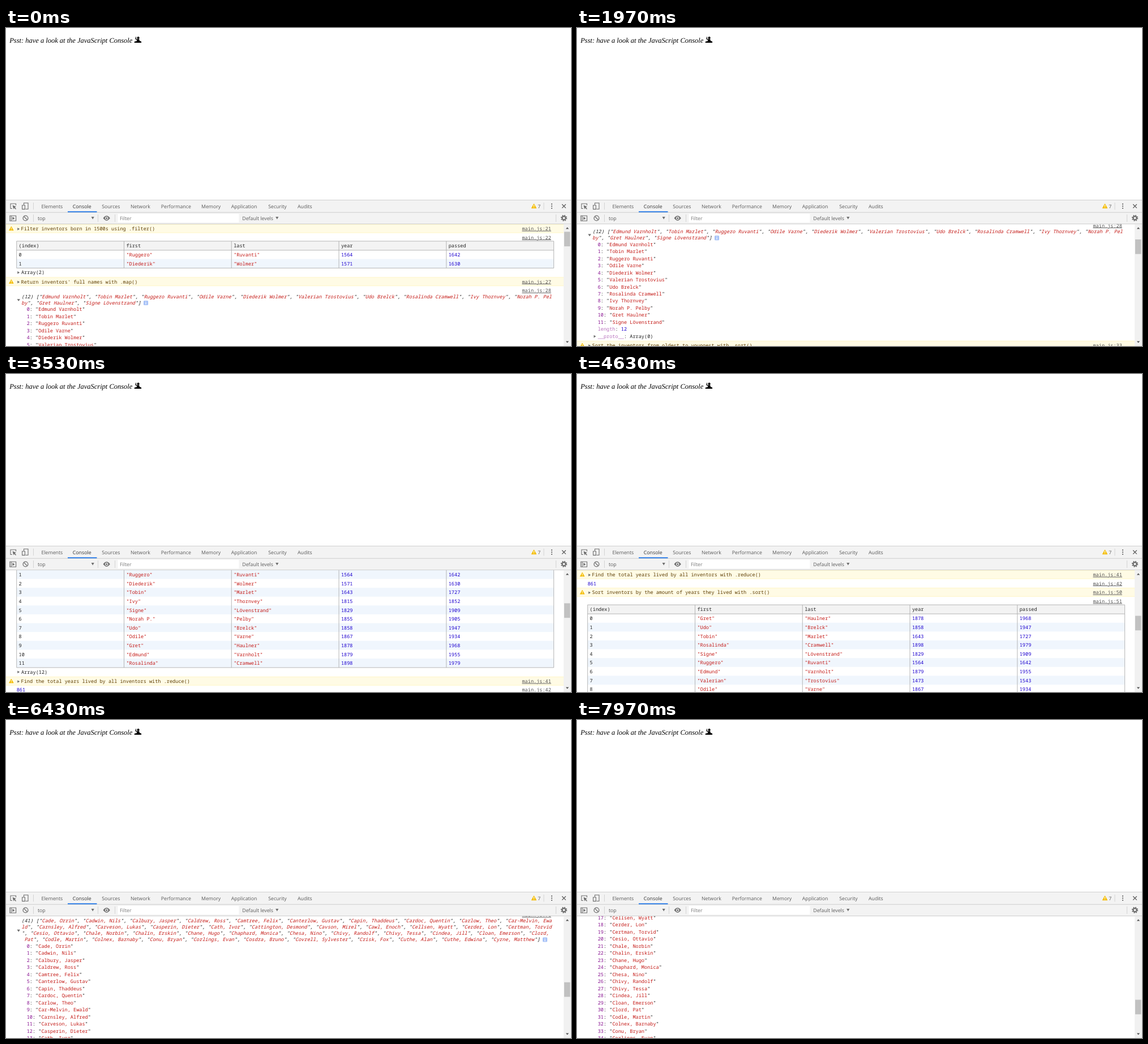
Recreate the animation shown at these times as an HTML page. Size 998 by 561 pixels, loop 8000 ms.

```html
<!DOCTYPE html>
<html lang="en">
<head>
<meta charset="utf-8">
<title>Console scroll</title>
<style>
  html, body { margin: 0; width: 100%; height: 100%; overflow: hidden; background: #fff; }
  #stage { display: block; width: 100vw; height: 100vh; }
  text { white-space: pre; text-rendering: geometricPrecision; }
  .page { font: italic 12.475px "Liberation Serif", "Times New Roman", serif; }
  .ui text { font: 8.75px "Open Sans", "Noto Sans", sans-serif; fill: #5a5a5a; }
  #log text { font: 11px "Noto Sans Mono", "DejaVu Sans Mono", monospace; fill: #222; }
  #log .it { font-style: italic; }
  #log .str { fill: #c41a16; }
  #log .num { fill: #1c00cf; }
  #log .key { fill: #881391; }
  #log .dim { fill: #b871bd; }
  #log .warn { fill: #5c3c00; }
  #log .link { fill: #545454; text-decoration: underline; }
</style>
</head>
<body>
<svg id="stage" viewBox="0 0 998 561" preserveAspectRatio="none">
  <rect width="998" height="561" fill="#fff"/>
  <text class="page" x="6.2" y="25.6">Psst: have a look at the JavaScript Console</text>
  <g>
    <circle cx="233.6" cy="17.4" r="2.1"/>
    <path d="M231.5 19.6h3.6l1.1 3.4 2.6.6.4 2.4h-12.6l.5-2.2 3.6-.5zM229.2 15.6l1 .2-.6 3 2.2 1.2-.3 1.3-3.3-1.9z"/>
  </g>
  <svg y="346" width="985" height="215"><g id="log"></g></svg>
  <g class="ui" id="ui"></g>
  <rect x="985" y="346" width="13" height="215" fill="#f1f1f1"/>
  <path d="M988.8 354.6h5.4l-2.7-3zM988.8 552.4h5.4l-2.7 3z" fill="#505050"/>
  <rect id="thumb" x="986" y="359.5" width="10.5" height="25.7" fill="#c1c1c1"/>
</svg>
<script>
const SCALE = 998 / 1280, LOOP = 8000, FPS = 30;
const $ = id => document.getElementById(id);

const inventors = [
  ["Edmund", "Varnholt", 1879, 1955], ["Tobin", "Marlet", 1643, 1727],
  ["Ruggero", "Ruvanti", 1564, 1642], ["Odile", "Varne", 1867, 1934],
  ["Diederik", "Wolmer", 1571, 1630], ["Valerian", "Trostovius", 1473, 1543],
  ["Udo", "Brelck", 1858, 1947], ["Rosalinda", "Cramwell", 1898, 1979],
  ["Ivy", "Thornvey", 1815, 1852], ["Norah P.", "Pelby", 1855, 1905],
  ["Gret", "Haulner", 1878, 1968], ["Signe", "Lövenstrand", 1829, 1909]
];
const people = `Cade, Orrin|Cadwin, Nils|Calbury, Jasper|Caldrew, Ross|Camtree, Felix
Canterlow, Gustav|Capin, Thaddeus|Cardoc, Quentin|Carlow, Theo|Car-Melvin, Ewald
Carnsley, Alfred|Carveson, Lukas|Casperin, Dieter|Cath, Ivor|Cattington, Desmond
Cavson, Mirel|Cawl, Enoch|Cellsen, Wyatt|Cerder, Lon|Certman, Torvid
Cesio, Ottavio|Chale, Norbin|Chalin, Erskin|Chane, Hugo|Chaphard, Monica
Chesa, Nino|Chivy, Randolf|Chivy, Tessa|Cindea, Jill|Cloan, Emerson|Clord, Pat
Codle, Martin|Colnex, Barnaby|Conu, Bryan|Corlings, Evan|Cosdra, Bruno
Covrell, Sylvester|Crisk, Fox|Cuthe, Alan|Cuthe, Edwina|Cyrne, Matthew`.split(/[|\n]/);
const lived = p => p[3] - p[2];

// Drawing helpers; y of text is the middle of its capitals
const rect = (x, y, w, h, fill, extra = "") =>
  `<rect x="${x}" y="${y}" width="${w}" height="${h}" fill="${fill}" ${extra}/>`;
const path = (d, fill, extra = "") => `<path d="${d}" fill="${fill}" ${extra}/>`;
const line = (d, color, w = 1) => path(d, "none", `stroke="${color}" stroke-width="${w}"`);
const text = (x, y, s, cls = "", extra = "") =>
  `<text x="${x}" y="${y + 3.6}" class="${cls}" ${extra}>${s}</text>`;
const span = (cls, s) => `<tspan class="${cls}">${s}</tspan>`;
const closed = (x, y) => path(`M${x} ${y - 3}v6l5 -3z`, "#6e6e6e");
const open = (x, y) => path(`M${x - 3.5} ${y - 2.5}h7l-3.5 5z`, "#6e6e6e");
const alertSign = (x, y, s) => `<g transform="translate(${x} ${y}) scale(${s})">` +
  path("M0 -5.5L5.8 5H-5.8z", "#f4bd00", 'stroke="#f4bd00" stroke-linejoin="round"') +
  line("M0 -2.5V1.6M0 2.8V4.2", "#fff", 1.5) + "</g>";

// Console messages, stacked from the top
let y = 0, out = "";
const link = n => text(1235, y + 10.5, "main.js:" + n, "link", 'text-anchor="end"');

function warn(s, n) {
  out += rect(0, y, 1264, 20, "#fffbe5") +
    line(`M0 ${y + .5}H1264M0 ${y + 19.5}H1264`, "#fff5c2") +
    alertSign(12, y + 10, .85) + closed(26, y + 11) + text(34, y + 10.8, s, "warn") + link(n);
  y += 20;
}

function number(v, n) {
  out += text(24, y + 10.5, v, "num") + link(n);
  y += 20;
}

function table(rows, n) {
  const colX = i => 24 + 243.4 * i, top = y + 18.5, body = y + 39, end = body + 20 * rows.length;
  out += link(n) + rect(24, top, 1217, 20.5, "#f3f3f3");
  ["(index)", "first", "last", "year", "passed"].forEach((s, i) => out += text(colX(i) + 5, y + 28.7, s));
  rows.forEach((row, k) => {
    if (k % 2) out += rect(24, body + 20 * k, 1217, 20, "#f0f6fd");
    [k, ...row].forEach((v, i) => out += text(colX(i) + 5, y + 49.8 + 20 * k,
      i == 1 || i == 2 ? `"${v}"` : v, ["", "str", "str", "num", "num"][i]));
  });
  let grid = `M24 ${body}H1241M24 ${end + .5}H1241M24 ${top}H1241`;
  for (let i = 0; i < 6; i++) grid += `M${colX(i)} ${top}V${end + .5}`;
  out += line(grid, "#aaa", 1.1);
  out += closed(26, y + 49.5 + 20 * rows.length) + text(34.5, y + 49.5 + 20 * rows.length, `Array(${rows.length})`);
  y += 60 + 20 * rows.length;
}

// Break anywhere at the column limit; a space at the limit starts the next line
function wrap(s, width) {
  const lines = [];
  while (s) {
    let end = Math.min(width, s.length);
    if (end < s.length && s[end - 1] == " ") end--;
    lines.push(s.slice(0, end));
    s = s.slice(end);
  }
  return lines;
}

function list(items, n) {
  out += link(n);
  const lines = wrap(`(${items.length}) [${items.map(s => `"${s}"`).join(", ")}]`, 182);
  let inside = false;
  lines.forEach((s, i) => {
    const runs = s.split('"').map((part, k) => {
      if (k) inside = !inside;
      return inside ? span("str", part) : part;
    });
    out += text(35, y + 24 + 14 * i, runs.join('"'), "it");
  });
  const last = lines.length - 1, ix = 35 + 6.6 * lines[last].length + 6, iy = y + 24 + 14 * last;
  out += open(28.5, y + 24 + 7 * last + 1) +
    rect(ix, iy - 5, 10.5, 10.5, "#a9c3f7", 'rx="2"') + line(`M${ix + 5.2} ${iy - 3}v1.6m0 1v4`, "#fff", 1.5);
  y += 39 + 14 * last;
  items.forEach(s => {
    const i = (items.shown = (items.shown ?? -1) + 1);
    out += text(47, y, span("key", i) + `: "${span("str", s)}"`);
    y += 16;
  });
  out += text(47, y, span("dim", "length") + ": " + span("num", items.length));
  out += closed(38, y + 16) + text(47, y + 16, span("dim", "__proto__") + ": Array(0)");
  y += 26;
}

warn("Filter inventors born in 1500s using .filter()", 21);
table(inventors.filter(p => p[2] >= 1500 && p[2] < 1600), 22);
warn("Return inventors' full names with .map()", 27);
list(inventors.map(p => p[0] + " " + p[1]), 28);
warn("Sort the inventors from oldest to youngest with .sort()", 33);
table([...inventors].sort((a, b) => a[2] - b[2]), 34);
warn("Find the total years lived by all inventors with .reduce()", 41);
number(inventors.reduce((sum, p) => sum + lived(p), 0), 42);
warn("Sort inventors by the amount of years they lived with .sort()", 50);
table([...inventors].sort((a, b) => lived(b) - lived(a)), 51);
warn("Sort people alphabetically by their last name using .sort()", 70);
list(people, 71);
$("log").innerHTML = out;

// Toolbars
function toolbars() {
  const gray = "#6e6e6e", dark = "#5a5a5a";
  const label = (x, y, s, fill = dark) => `<text x="${x}" y="${y}" style="fill:${fill}">${s}</text>`;
  const ring = (x, y, r, w, extra = "") =>
    `<circle cx="${x}" cy="${y}" r="${r}" fill="none" stroke="${gray}" stroke-width="${w}" ${extra}/>`;
  let s = rect(0, 303, 998, 43, "#f3f3f3") +
    line("M0 303.5H998M0 325.3H998M0 345.7H998", "#cbcbcb", .9) +
    line("M48.5 308v12.5M950 308v12.5M48.5 329v13M162.5 329v13M192.5 329v13M971.5 329v13", "#ccc", .8);
  const tabs = { Elements: 62.5, Console: 117.8, Sources: 169.3, Network: 220, Performance: 273.8,
    Memory: 345, Application: 397.8, Security: 463.2, Audits: 515 };
  for (const name in tabs) s += label(tabs[name], 318, name, name == "Console" ? "#333" : dark);
  s += rect(109, 323.4, 51.5, 1.7, "#1a73e8");
  // inspect and device icons
  s += line("M11 318.5H8V310H17.5V313", gray, 1.1) +
    path("M11.5 312.5l6.5 2.8-2.5 1 2.6 2.8-1 1-2.7-2.7-1.1 2.3z", gray) +
    line("M31.5 312V308.7H39V319.5H34.5", gray, 1.1) + line("M28.6 312.8H33.4V319.6H28.6z", gray, 1.1);
  // warning count, menu, close
  s += alertSign(932.5, 314.2, .74) + label(939.3, 318, "7") +
    [310.6, 314.3, 318].map(cy => `<circle cx="964" cy="${cy}" r="1.1" fill="${dark}"/>`).join("") +
    line("M982.2 311L988.8 317.6M988.8 311L982.2 317.6", dark, 1.3);
  // sidebar, clear, context
  s += line("M6.8 331.2H17.6V340.2H6.8zM9.2 331.2V340.2", gray, 1.1) +
    path("M11.3 333v5.4l4.2-2.7z", gray) +
    ring(34.5, 335.5, 4.4, 1.3) + line("M31.5 332.5l6 6", gray, 1.3) +
    label(56, 338.8, "top") + path("M150.6 333h5.2l-2.6 4.6z", gray);
  // eye, filter, levels, gear
  s += path("M171.6 335.5Q177.7 327.2 183.8 335.5Q177.7 343.8 171.6 335.5z", gray) +
    '<circle cx="177.7" cy="335.5" r="2.7" fill="#f3f3f3"/>' +
    `<circle cx="177.7" cy="335.5" r="1.5" fill="${gray}"/>` +
    rect(197.5, 328, 214, 15, "#fff") + label(201, 339, "Filter", "#777") +
    label(417.3, 338.8, "Default levels") + path("M476.2 333h5.2l-2.6 4.6z", gray) +
    ring(985.5, 335.3, 3.1, 2.2) + ring(985.5, 335.3, 4.7, 1.9, 'stroke-dasharray="1.85 1.84"');
  return s;
}
$("ui").innerHTML = toolbars();

// Scroll: ease in from rest, then a steady run
const START = 1015, RAMP = 561, SPEED = .219;
const keys = [[START + RAMP, SPEED * RAMP / 2], [1967, 147], [3533, 490], [4633, 731],
  [5567, 936], [6433, 1124], [7967, 1460]];

function scrollAt(t) {
  const u = t - START;
  if (u <= 0) return 0;
  if (u < RAMP) return SPEED * u * u / (2 * RAMP);
  const i = keys.findIndex(k => t <= k[0]);
  if (i < 0) return keys[keys.length - 1][1];
  if (i == 0) return keys[0][1];
  const [t0, s0] = keys[i - 1], [t1, s1] = keys[i];
  return s0 + (s1 - s0) * (t - t0) / (t1 - t0);
}

function draw(t) {
  const step = Math.floor((t + 4) * FPS / 1000);
  const pos = Math.round(scrollAt(step * 1000 / FPS));
  $("log").setAttribute("transform", `scale(${SCALE}) translate(0 ${-pos})`);
  $("thumb").setAttribute("y", 359.5 + pos * .0918);
}

const begin = performance.now();
function tick() {
  draw((performance.now() - begin) % LOOP);
  requestAnimationFrame(tick);
}
tick();
</script>
</body>
</html>
```
